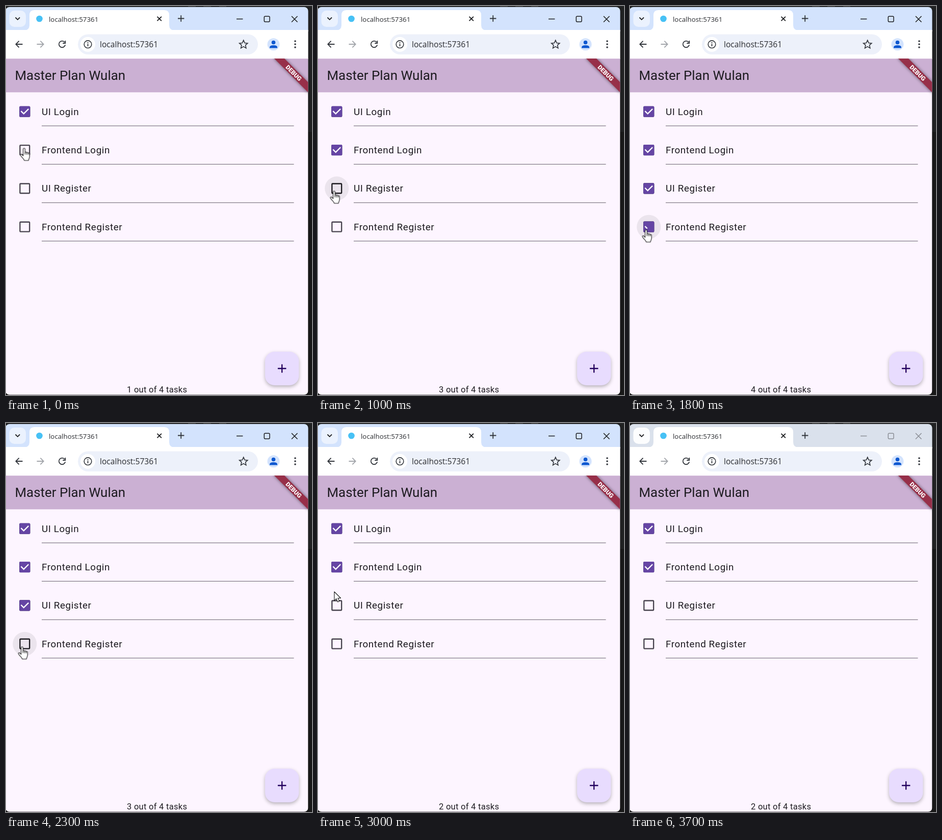
An HTML page for the animation above (3.8 s loop, 600 px wide and 763 px high).

```html
<!DOCTYPE html>
<html lang="en">
<head>
<meta charset="utf-8">
<title>Task list</title>
<style>
html, body { margin: 0; width: 100%; height: 100%; overflow: hidden; background: #181818; }
svg { display: block; width: 600px; height: 763px; }
text { font-family: Roboto, sans-serif; fill: #1d1b20; }
.url { font-family: "Open Sans", "Noto Sans", sans-serif; fill: #2a2c30; }
.line { fill: none; stroke: #30343a; stroke-width: 1.8; }
.item { font-size: 18.83px; letter-spacing: .588px; }
.count { font-size: 16.48px; letter-spacing: .294px; }

.row { --halo: 0; --edge: #49454f; --on: 0; --rest: 1; }
.row0 { --on: 1; --rest: 0; }
.halo { fill: rgb(29 27 32 / var(--halo)); }
.edge { fill: none; stroke: var(--edge); stroke-width: 2.35; }
.fill { fill: #6545a4; opacity: var(--on); }
.tick {
  fill: none; stroke: #fff; stroke-width: 2.35; opacity: var(--on);
  stroke-dasharray: 1 2; stroke-dashoffset: var(--rest);
}

.bar { fill: #d3e3fd; }
.search { fill: #ebf2fe; }
.ctl { fill: none; stroke: #1b1c1f; stroke-width: 1.5; }

/* a small lead keeps each step clear of its 100 ms mark */
.row1, .row2, .row3, .digits, .cursor, .hand, .arrow, .bar, .search, .ctl {
  animation: 3.8s step-end -20ms infinite;
}
.row1 { animation-name: row1; }
.row2 { animation-name: row2; }
.row3 { animation-name: row3; }
.digits { animation-name: digits; }
.cursor { animation-name: move; }
.hand { animation-name: hand; }
.arrow { animation-name: arrow; }
.bar { animation-name: bar; }
.search { animation-name: search; }
.ctl { animation-name: ctl; }

@keyframes row1 {
  0% { --halo: 0; --edge: #49454f; --on: 0; --rest: 1; }
  2.632% { --halo: .08; --edge: #1d1b20; }
  5.263% { --halo: .13; }
  7.895% { --on: 1; --rest: .7; }
  10.526% { --halo: .08; --rest: 0; }
  13.158% { --halo: 0; --edge: #49454f; }
}
@keyframes row2 {
  0% { --halo: 0; --edge: #49454f; --on: 0; --rest: 1; }
  18.421% { --halo: .08; --edge: #1d1b20; }
  28.947% { --halo: .13; --on: 1; --rest: .7; }
  31.579% { --rest: 0; }
  34.21% { --halo: .08; }
  36.842% { --halo: 0; }
  68.421% { --halo: .08; }
  71.053% { --halo: .13; }
  73.684% { --rest: .7; }
  76.316% { --halo: .08; --on: 0; --rest: 1; }
  78.947% { --halo: 0; --edge: #49454f; }
}
@keyframes row3 {
  0% { --halo: 0; --edge: #49454f; --on: 0; --rest: 1; }
  39.474% { --halo: .08; --edge: #1d1b20; }
  47.368% { --on: 1; --rest: .7; }
  50% { --halo: .13; --rest: 0; }
  52.632% { --halo: .08; }
  57.895% { --halo: .13; --rest: .7; }
  60.526% { --halo: .08; --on: 0; --rest: 1; }
  65.789% { --halo: 0; --edge: #49454f; }
}
@keyframes digits {
  0% { transform: translateY(0); }
  5.263%, 73.684% { transform: translateY(-30px); }
  26.316%, 55.263% { transform: translateY(-60px); }
  44.737% { transform: translateY(-90px); }
}
@keyframes move {
  0% { transform: translate(35.5px, 279px); }
  7.895% { transform: translate(35.5px, 279px); animation-timing-function: steps(3); }
  15.789% { transform: translate(33.5px, 321px); animation-timing-function: steps(3); }
  23.684% { transform: translate(31.5px, 363px); }
  34.21% { transform: translate(31.5px, 363px); animation-timing-function: steps(3); }
  42.105% { transform: translate(31.5px, 439px); }
  60.526% { transform: translate(31.5px, 439px); animation-timing-function: steps(4); }
  71.053% { transform: translate(36px, 346px); }
  76.316% { transform: translate(36px, 346px); animation-timing-function: steps(2); }
  81.579%, 100% { transform: translate(28px, 316px); }
}
@keyframes hand {
  0%, 18.421%, 39.474%, 68.421% { opacity: 1; }
  13.158%, 36.842%, 65.789%, 78.947% { opacity: 0; }
}
@keyframes arrow {
  0%, 18.421%, 39.474%, 68.421%, 84.21% { opacity: 0; }
  13.158%, 36.842%, 65.789%, 78.947% { opacity: 1; }
}
@keyframes bar { 0% { fill: #d3e3fd; } 97.368% { fill: #dae1ec; } }
@keyframes search { 0% { fill: #ebf2fe; } 97.368% { fill: #fcfdfe; } }
@keyframes ctl { 0% { stroke: #1b1c1f; } 97.368% { stroke: #8b8f96; } }
</style>
</head>
<body>
<svg viewBox="0 0 600 763">
  <defs>
    <clipPath id="win"><rect x="-1" y="2" width="593.5" height="760.5" rx="8"/></clipPath>
    <clipPath id="page"><rect y="103" width="592.5" height="660"/></clipPath>
    <clipPath id="slot"><rect x="230" y="742" width="17" height="20"/></clipPath>
  </defs>

  <!-- desktop -->
  <rect width="600" height="763" fill="#181818"/>
  <rect x="590" width="10" height="247" fill="#202122"/>
  <rect width="600" height="2" fill="#252627"/>
  <path d="M357 .7h15M387 .7h15M418 .7h14" stroke="#555" stroke-width="1"/>

  <g clip-path="url(#win)">
    <!-- tab strip -->
    <rect class="bar" x="-1" width="594" height="50"/>
    <rect class="search" x="6.5" y="9" width="32.5" height="32" rx="10"/>
    <path class="line" d="M18.5 22.5l4.3 4.3l4.3-4.3" style="stroke:#1b1c1f"/>
    <path d="M36 47.5q10 0 10-10V18q0-10 10-10H310q10 0 10 10V37.500q0 10 10 10Z" fill="#fff"/>
    <circle cx="65.500" cy="25" r="6.300" fill="#47c1f5"/>
    <text class="url" x="84" y="30.700" font-size="13.3">localhost:57361</text>
    <path class="line" d="M296.500 20.800l8.400 8.400M304.900 20.800l-8.400 8.400" style="stroke:#1b1c1f"/>
    <path class="line" d="M337 24.500h12.400M343.200 18.300v12.400"/>
    <path class="ctl" d="M452 25.500h12.400M560 20l11.500 11.500M571.500 20L560 31.500"/>
    <rect class="ctl" x="506.300" y="20.200" width="10.700" height="10.700" rx="1.800"/>

    <!-- toolbar -->
    <rect x="-1" y="47" width="594" height="57" fill="#fff"/>
    <path class="line" d="M32.500 75H19.500M25.600 68.700L19.300 75l6.300 6.300"/>
    <path class="line" d="M60.500 75h13M67.400 68.700l6.300 6.300l-6.300 6.300" style="stroke:#a2a5aa"/>
    <path class="line" d="M115 71a6.300 6.300 0 1 0 1.200 5.300M116.300 68v5h-5"/>
    <rect x="141" y="55.500" width="353" height="39.500" rx="19.750" fill="#edf1fa"/>
    <circle cx="160.500" cy="75.200" r="14.500" fill="#fff"/>
    <circle class="line" cx="160.500" cy="75.200" r="7.300" style="stroke-width:1.600"/>
    <path class="line" d="M160.500 74.300v4.700M160.500 71v1.900"/>
    <text class="url" x="184" y="80.700" font-size="15.600">localhost:57361</text>
    <path class="line" d="M465.700 67.200l2.400 5.300l5.700 .6l-4.300 3.800l1.300 5.700l-5.100-3l-5.100 3l1.300-5.700l-4.300-3.800l5.700-.6Z" style="stroke-width:1.600"/>
    <circle cx="524.500" cy="75.300" r="12" fill="#d3e3fd"/>
    <circle cx="524.500" cy="71.500" r="3.800" fill="#0b57d0"/>
    <path d="M517 82.500v-1.500q0-4 7.500-4t7.500 4v1.500Z" fill="#0b57d0"/>
    <g fill="#30343a">
      <circle cx="567" cy="69" r="1.800"/><circle cx="567" cy="75" r="1.800"/><circle cx="567" cy="81" r="1.800"/>
    </g>

    <!-- app -->
    <g clip-path="url(#page)">
      <rect x="-1" y="103" width="594" height="660" fill="#fdf5ff"/>
      <rect x="-1" y="103.300" width="594" height="66" fill="#cbb0d3"/>
      <text x="17.500" y="145" font-size="25.900">Master Plan Wulan</text>
      <g transform="translate(592.500 103) rotate(45)">
        <rect x="-48" y="33" width="96" height="14.100" fill="#972f49" style="filter:drop-shadow(0 0 3px rgb(0 0 0 / .5))"/>
        <text y="44.300" font-size="12" font-weight="900" text-anchor="middle" style="fill:#fff">DEBUG</text>
      </g>
      <g id="rows"></g>
      <rect x="508" y="678" width="66.300" height="66" rx="18.800" fill="#e8dcfe" style="filter:drop-shadow(0 3.500px 3.500px rgb(0 0 0 / .28))"/>
      <path d="M532.900 711h16.500M541.150 702.750v16.500" stroke="#22005d" stroke-width="2.350"/>
      <g class="count">
        <g clip-path="url(#slot)"><g class="digits" id="digits"></g></g>
        <text x="250.900" y="757.500">out of 4 tasks</text>
      </g>
    </g>
  </g>

  <g class="cursor" stroke="#111" stroke-width="1.100" stroke-linejoin="round">
    <path class="arrow" fill="#fff" d="M0 0V17.300l3.900-3.600l2.700 6.200l3.100-1.300l-2.700-6.100h5.500Z"/>
    <g class="hand" transform="translate(-8.100 -.7)">
      <path fill="#fff" d="M6.200 15.500V2.600a1.900 1.900 0 0 1 3.800 0V9a1.700 1.700 0 0 1 3.200 .6a1.600 1.600 0 0 1 3 .7a1.500 1.500 0 0 1 2.600 1.200V17c0 4-2 5-2.200 7.800H8.400C8 21.500 3 18.500 1 14.500C.4 12.800 2.200 11.800 3.600 12.800Z"/>
      <path fill="none" d="M10 9v4M13.200 9.600v3.600M16.200 10.300v3"/>
    </g>
  </g>
</svg>
<script>
const pitch = 75.33;
const tasks = ["UI Login", "Frontend Login", "UI Register", "Frontend Register"];

const row = (label, i) => `
  <g class="row row${i}" transform="translate(0 ${207.2 + i * pitch})">
    <circle class="halo" cx="36.8" r="23.5"/>
    <rect class="edge" x="27.4" y="-9.4" width="18.8" height="18.8" rx="1"/>
    <rect class="fill" x="26.2" y="-10.6" width="21.2" height="21.2" rx="1.8"/>
    <path class="tick" pathLength="1" d="M29.4-1.1l5.3 5.3l9.5-9.5"/>
    <text class="item" x="70" y="6.6">${label}</text>
    <rect x="70" y="27.3" width="494.5" height="1.2" fill="#7d7781"/>
  </g>`;

const digit = (n, i) => `<text x="237" y="${757.5 + i * 30}">${n}</text>`;

document.getElementById("rows").innerHTML = tasks.map(row).join("");
document.getElementById("digits").innerHTML = [1, 2, 3, 4].map(digit).join("");
</script>
</body>
</html>
```
